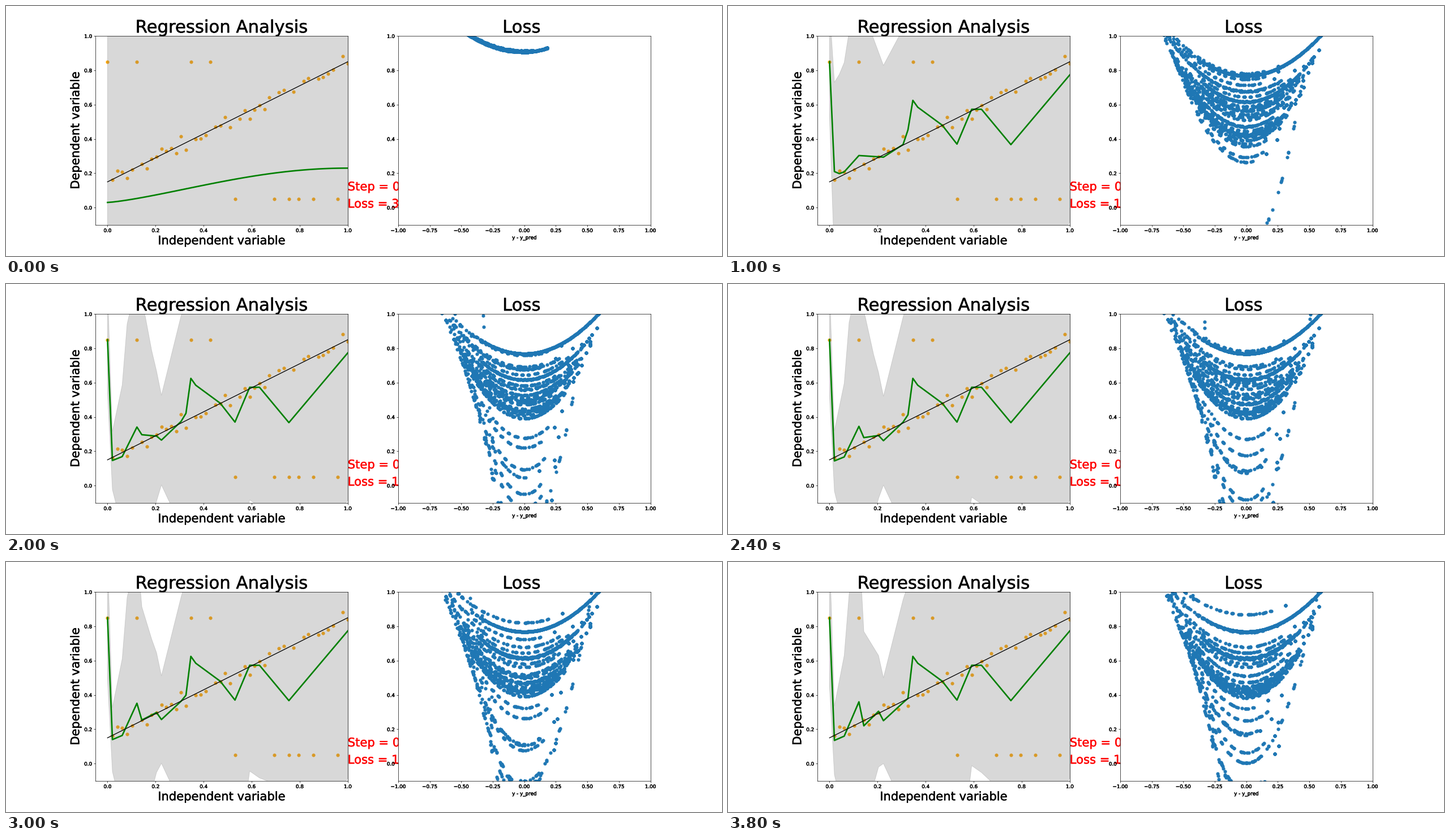
Recreate the animation shown at these times as a matplotlib script. Size 1265x443 px, loop 4 s.

```python
import numpy as np
import matplotlib.pyplot as plt
from matplotlib.animation import FuncAnimation
from matplotlib.patheffects import withStroke

plt.rcParams["font.family"] = "DejaVu Sans"
DPI, FRAMES, STEP = 63.25, 20, 200

# Noisy line with a few outliers: high on the left, low on the right
N = 50
idx = np.arange(N)
x = idx / (N - 1)
y = .15 + .7 * x + np.random.default_rng(4).normal(0, .022, N)
y[[0, 6, 17, 21]] = .85
y[[26, 34, 37, 39, 42, 47]] = .05


def path(*points):
    return np.interp(idx, *zip(*points))


def mean_path(*head):
    return path(*head, (17, .625), (18, .585), (23, .48), (26, .37),
                (29, .573), (31, .573), (37, .367), (49, .773))


def std_path(notch, *head):
    return path(*head, (21, .74), (23, .59), (26, .64), (28, .76),
                (29, notch), (31, notch + .04), (33, .61), (35, .59),
                (37, .64), (40, .86), (49, .86))


# Training stages: time -> predicted mean and standard deviation
STAGES = {
    0: (.03 + .2 * np.sin(np.pi / 2 * x)**1.3,
        .985 + .01 * x),
    200: (.3 + .42 * x,
          .77 + 0 * x),
    600: (mean_path((0, .85), (1, .27), (2, .235), (15, .355), (16, .47)),
          std_path(.72, (0, .36), (1, .88), (8, .86), (15, .73))),
    1400: (mean_path((0, .85), (1, .15), (3, .172), (6, .335), (11, .27),
                     (15, .38), (16, .435)),
           std_path(.68, (0, .28), (1, .16), (3, .4), (4, .7), (7, .88),
                    (9, .53), (11, .265), (15, .62), (17, .74))),
    3800: (mean_path((0, .85), (1, .135), (3, .16), (6, .36), (7, .22),
                     (10, .305), (11, .25), (15, .355), (16, .38)),
           std_path(.585, (0, .4), (1, .2), (3, .47), (4, .76), (6, .95),
                    (7, .55), (11, .25), (15, .6), (17, .73))),
}
TIMES = list(STAGES)


def predict(t):
    k = min(np.searchsorted(TIMES, t, side="right"), len(TIMES) - 1)
    a, b = TIMES[k - 1], TIMES[k]
    w = (t - a) / (b - a)
    return [(1 - w) * p + w * q for p, q in zip(STAGES[a], STAGES[b])]


def nll(d, std):
    return .5 * np.log(2 * np.pi) + np.log(std) + d**2 / (2 * std**2)


def outline(mu, std):
    return np.column_stack([np.r_[x, x[::-1]],
                            np.r_[mu - std, (mu + std)[::-1]]])


def heavy(text, color="black"):
    text.set_path_effects([withStroke(linewidth=.5, foreground=color)])
    return text


fig, (ax, ax_loss) = plt.subplots(
    ncols=2, figsize=(1265 / DPI, (443 + 1e-6) / DPI), dpi=DPI, facecolor="white")
fig.subplots_adjust(left=.125, right=.9, bottom=.125, top=.88, wspace=.2)

ax.set(xlim=(-.05, 1), ylim=(-.1, 1), xticks=np.arange(6) / 5)
heavy(ax.set_title("Regression Analysis", fontsize=35))
heavy(ax.set_xlabel("Independent variable", fontsize=24))
heavy(ax.set_ylabel("Dependent variable", fontsize=24, labelpad=5.5))

ax_loss.set(xlim=(-1, 1), ylim=(-.1, 1), xticks=np.arange(-4, 5) / 4)
heavy(ax_loss.set_title("Loss ", fontsize=35))
heavy(ax_loss.set_xlabel("y - y_pred", fontsize=10))

for a in (ax, ax_loss):
    a.set_yticks(np.arange(6) / 5)
    for label in a.get_xticklabels() + a.get_yticklabels():
        heavy(label)

ax.scatter(x, y, color="orange")
band = ax.fill_between(x, 0 * x, 1 + 0 * x, color="gray", alpha=.3)
fit, = ax.plot(x, x, color="green", lw=3)
ax.plot([0, 1], [.15, .85], color="black", lw=1.5)
heavy(ax.text(1, .1, "Step = 0", fontsize=24, color="red"), "red")
loss_text = heavy(ax.text(1, 0, "", fontsize=24, color="red"), "red")
dots = ax_loss.scatter(np.zeros(N * N), np.zeros(N * N))


def update(i):
    mu, std = predict(i * STEP)
    band.set_verts([outline(mu, std)])
    fit.set_ydata(mu)
    # every prediction is compared with every observation
    d = mu[:, None] - y[None, :]
    dots.set_offsets(np.column_stack([d.ravel(), nll(d, std[:, None]).ravel()]))
    loss_text.set_text("Loss = 3" if i == 0 else "Loss = 1")
    return band, fit, dots, loss_text


anim = FuncAnimation(fig, update, frames=FRAMES, interval=STEP, repeat=True,
                     repeat_delay=0, blit=False)
plt.show()
```
